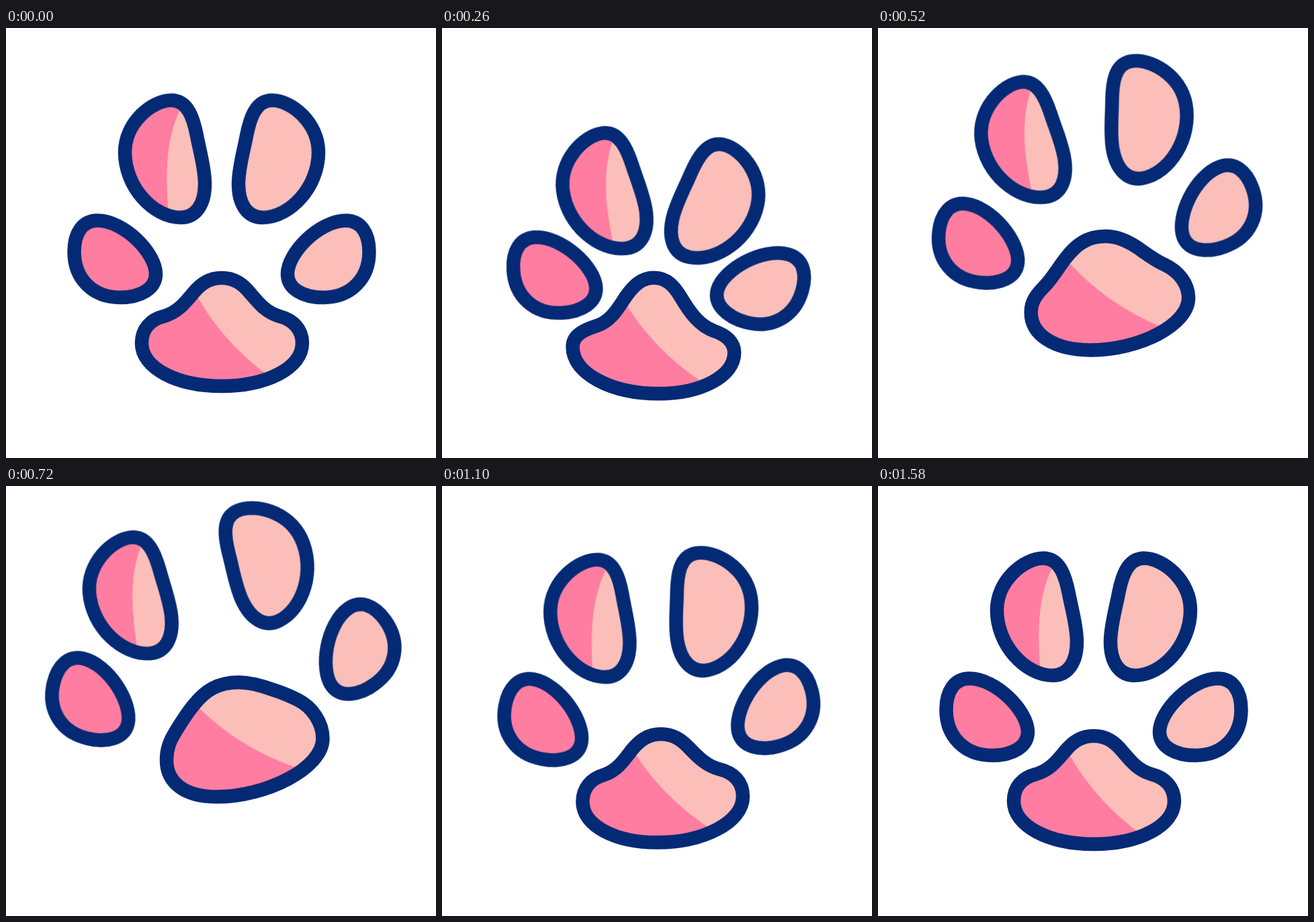
These frames come from a looping animation (640 by 640 pixels, 1.6 s). An HTML page without scripts:

```html
<!DOCTYPE html>
<html lang="en">
<head>
<meta charset="utf-8">
<title>Paw</title>
<style>
  :root {
    --in: cubic-bezier(.4, 0, .7, .7);
    --out: cubic-bezier(.3, .5, .6, 1);
    --cruise: cubic-bezier(.35, .4, .65, .7);
    --overshoot: cubic-bezier(.35, .15, .5, 1.1);
    --navy: #042a76;
    --light: #fcbeb9;
    --dark: #ff7da0;
  }
  html, body { margin: 0; height: 100%; overflow: hidden; background: #fff; }
  svg { display: block; width: 100vw; height: 100vh; }
  .line { fill: none; stroke: var(--navy); stroke-width: 20.5; }
  .light { fill: var(--light); }
  .dark { fill: var(--dark); }

  .toe, .pad, .shade { animation: 1.6s linear infinite; }
  .toe { transform-box: fill-box; transform-origin: center; }
  .shade { transform-origin: 333.5px 458px; }
  .left-inner { animation-name: left-inner; }
  .right-inner { animation-name: right-inner; }
  .left-outer { animation-name: left-outer; }
  .right-outer { animation-name: right-outer; }
  .pad { animation-name: pad; }
  .shade { animation-name: shade; }

  @keyframes left-inner {
    0%      { transform: translate(0, 0) rotate(0deg); animation-timing-function: var(--in); }
    8.75%   { transform: translate(7.5px, 35px) rotate(-2.4deg); animation-timing-function: var(--out); }
    15%     { transform: translate(5px, 51px) rotate(-6.5deg); animation-timing-function: var(--in); }
    23.75%  { transform: translate(-2px, 42.6px) rotate(-9.2deg); }
    33.75%  { transform: translate(-25px, -36px) rotate(-7deg); animation-timing-function: var(--out); }
    39.375% { transform: translate(-43px, -43px) rotate(-6deg); animation-timing-function: var(--in); }
    45%     { transform: translate(-52.4px, -30.8px) rotate(-4.5deg); }
    58.75%  { transform: translate(-34.8px, -.2px) rotate(-1deg); }
    68.75%  { transform: translate(-16px, 2px) rotate(1deg); animation-timing-function: var(--out); }
    78.75%  { transform: translate(-3.1px, 1px) rotate(1.9deg); animation-timing-function: ease-out; }
    98.75%, 100% { transform: translate(0, 0) rotate(0deg); }
  }
  @keyframes right-inner {
    0%      { transform: translate(0, 0) rotate(0deg); animation-timing-function: var(--in); }
    8.75%   { transform: translate(5px, 52px) rotate(10deg); animation-timing-function: var(--out); }
    15%     { transform: translate(4px, 69px) rotate(13deg); animation-timing-function: var(--in); }
    23.75%  { transform: translate(2px, 53px) rotate(10deg); }
    33.75%  { transform: translate(-5px, -76.5px) rotate(-13deg); animation-timing-function: var(--out); }
    39.375% { transform: translate(-12px, -91px) rotate(-22deg); animation-timing-function: var(--in); }
    45%     { transform: translate(-16px, -83px) rotate(-25.5deg); }
    58.75%  { transform: translate(-6.4px, -30.5px) rotate(-18deg); }
    68.75%  { transform: translate(-3px, -10.5px) rotate(-10deg); animation-timing-function: var(--out); }
    78.75%  { transform: translate(-1px, -2.5px) rotate(-4deg); animation-timing-function: ease-out; }
    98.75%, 100% { transform: translate(0, 0) rotate(0deg); }
  }
  @keyframes left-outer {
    0%      { transform: translate(0, 0) rotate(0deg); animation-timing-function: var(--in); }
    8.75%   { transform: translate(4.4px, 17.4px) rotate(-1deg); animation-timing-function: var(--out); }
    15%     { transform: translate(5.5px, 25px) rotate(-3deg); animation-timing-function: var(--in); }
    23.75%  { transform: translate(3.7px, 17px) rotate(-3deg); }
    33.75%  { transform: translate(-14.5px, -28px) rotate(7deg); animation-timing-function: var(--out); }
    39.375% { transform: translate(-27px, -33px) rotate(11deg); animation-timing-function: var(--in); }
    45%     { transform: translate(-35px, -25.5px) rotate(13deg); }
    58.75%  { transform: translate(-23px, 3.5px) rotate(13deg); }
    68.75%  { transform: translate(-10.5px, 5px) rotate(10.5deg); animation-timing-function: var(--out); }
    78.75%  { transform: translate(-.3px, 3.6px) rotate(7deg); animation-timing-function: ease-out; }
    98.75%, 100% { transform: translate(0, 0) rotate(0deg); }
  }
  @keyframes right-outer {
    0%      { transform: translate(0, 0) rotate(0deg); animation-timing-function: var(--in); }
    8.75%   { transform: translate(-5.5px, 37.4px) rotate(14deg); animation-timing-function: var(--out); }
    15%     { transform: translate(-6px, 45px) rotate(17deg); animation-timing-function: var(--in); }
    23.75%  { transform: translate(-1.3px, 23.5px) rotate(12deg); }
    33.75%  { transform: translate(27.5px, -88px) rotate(-24deg); animation-timing-function: var(--out); }
    39.375% { transform: translate(38px, -107px) rotate(-33deg); animation-timing-function: var(--in); }
    45%     { transform: translate(41.6px, -100px) rotate(-35.5deg); }
    58.75%  { transform: translate(28.6px, -38px) rotate(-26.5deg); }
    68.75%  { transform: translate(14.5px, -14px) rotate(-15deg); animation-timing-function: var(--out); }
    78.75%  { transform: translate(1.2px, -2.5px) rotate(-7deg); animation-timing-function: ease-out; }
    98.75%, 100% { transform: translate(0, 0) rotate(0deg); }
  }

  .pad { d: path("M321 372C340 372 352 381 363 394C375 408 386 423 407 429C427 434 441 448 441 469C441 506 388 533 321 533C254 533 202 506 202 469C202 448 215 434 235 429C256 423 267 408 279 394C290 381 302 372 321 372Z"); }
  @keyframes pad {
    0% { animation-timing-function: var(--in); }
    8.75% {
      d: path("M314 378C333 378 344 391 353 405C367 428 381 445 402 452C419 457 431 469 431 487C431 518 384 541 323 541C253 541 193 512 193 473C193 456 208 447 228 443C250 438 261 420 272 405C284 389 295 378 314 378Z");
      animation-timing-function: var(--out);
    }
    15% {
      d: path("M315 376C334 376 345 389 354 404C368 428 382 447 404 455C422 461 434 472 434 488C434 524 384 550 323 550C253 550 193 520 193 478C193 460 209 452 229 446C250 440 261 421 272 404C284 387 296 376 315 376Z");
      animation-timing-function: var(--in);
    }
    23.75% {
      d: path("M319 353C338 353 349 366 359 382C373 404 385 424 408 433C427 440 440 448 440 463C440 495 390 519.5 324 519.5C254 519.5 201 493 201 459C201 446 216 439 235 431C256 422 265 403 278 384C289 367 300 353 319 353Z");
      animation-timing-function: var(--overshoot);
    }
    45% {
      d: path("M346 292C365 292 381 297 397 303C410 307 422 312 434 318C456 329 471.5 352 471.5 376C471.5 420 387 462.5 314 462.5C264 462.5 239 440 239 408C239 391 244 379 252 366C260 353 269 338 280 325C297 304 316 292 346 292Z");
      animation-timing-function: var(--cruise);
    }
    58.75% {
      d: path("M338 358C355 358 366 366 378 375C395 387 409 396 429 400C450 404 464 418 464 441C464 486 384 520.5 315 520.5C262 520.5 227.5 500 227.5 467C227.5 449 237 439 251 431C269 422 277 405 288 389C300 372 314 358 338 358Z");
      animation-timing-function: var(--out);
    }
    78.75% {
      d: path("M323 372C342 372 354 381 365 393C377 407 390 422 410 427C430 432 444 446 444 467C444 505 389 533 322 533C257 533 205 507 205 471C205 450 218 435 238 430C259 424 270 408 281 394C292 381 304 372 323 372Z");
      animation-timing-function: ease-out;
    }
    98.75%, 100% { d: path("M321 372C340 372 352 381 363 394C375 408 386 423 407 429C427 434 441 448 441 469C441 506 388 533 321 533C254 533 202 506 202 469C202 448 215 434 235 429C256 423 267 408 279 394C290 381 302 372 321 372Z"); }
  }
  @keyframes shade {
    0%     { transform: translate(0, 0) rotate(0deg); animation-timing-function: var(--in); }
    8.75%  { transform: translate(-10px, 13px) rotate(0deg); animation-timing-function: var(--out); }
    15%    { transform: translate(-8px, 16px) rotate(-2deg); animation-timing-function: var(--in); }
    23.75% { transform: translate(-2.5px, -9px) rotate(-5deg); animation-timing-function: var(--overshoot); }
    45%    { transform: translate(23.5px, -80.5px) rotate(-17deg); animation-timing-function: var(--cruise); }
    58.75% { transform: translate(22.5px, -14.8px) rotate(-11deg); animation-timing-function: var(--out); }
    78.75% { transform: translate(3px, -.5px) rotate(-1.5deg); animation-timing-function: ease-out; }
    98.75%, 100% { transform: translate(0, 0) rotate(0deg); }
  }
</style>
</head>
<body>
<svg viewBox="0 0 640 640">
  <defs>
    <path id="inner" d="M246 107.5C271 107.5 279 135 284 160C288 182 296 208 296 232C296 262 283 282 260 282C219 282 177 236 177 185C177 141 217 107.5 246 107.5Z"/>
    <path id="outer" d="M136 286.5C176 286.5 223 335 223 366C223 388 200 401 170 401C128 401 101.5 372 101.5 333C101.5 305 114 286.5 136 286.5Z"/>
    <clipPath id="pad-clip"><path class="pad"/></clipPath>
  </defs>

  <g class="toe left-inner">
    <use href="#inner" class="light"/>
    <path class="dark" d="M263 114C235 165 238 225 242 279C205 268 177 230 177 185C177 141 217 107.5 246 107.5C252 107.5 258 110 263 114Z"/>
    <use href="#inner" class="line"/>
  </g>
  <g class="toe right-inner">
    <g transform="matrix(-1 0 0 1 642 0)">
      <use href="#inner" class="light"/>
      <use href="#inner" class="line"/>
    </g>
  </g>
  <g class="toe left-outer">
    <use href="#outer" class="dark"/>
    <use href="#outer" class="line"/>
  </g>
  <g class="toe right-outer">
    <g transform="matrix(-1 0 0 1 642 0)">
      <use href="#outer" class="light"/>
      <use href="#outer" class="line"/>
    </g>
  </g>

  <path class="pad light"/>
  <g clip-path="url(#pad-clip)">
    <path class="shade dark" d="M268 365L275 382Q317 465 395 521L430 545L400 650H100V365Z"/>
  </g>
  <path class="pad line"/>
</svg>
</body>
</html>
```
